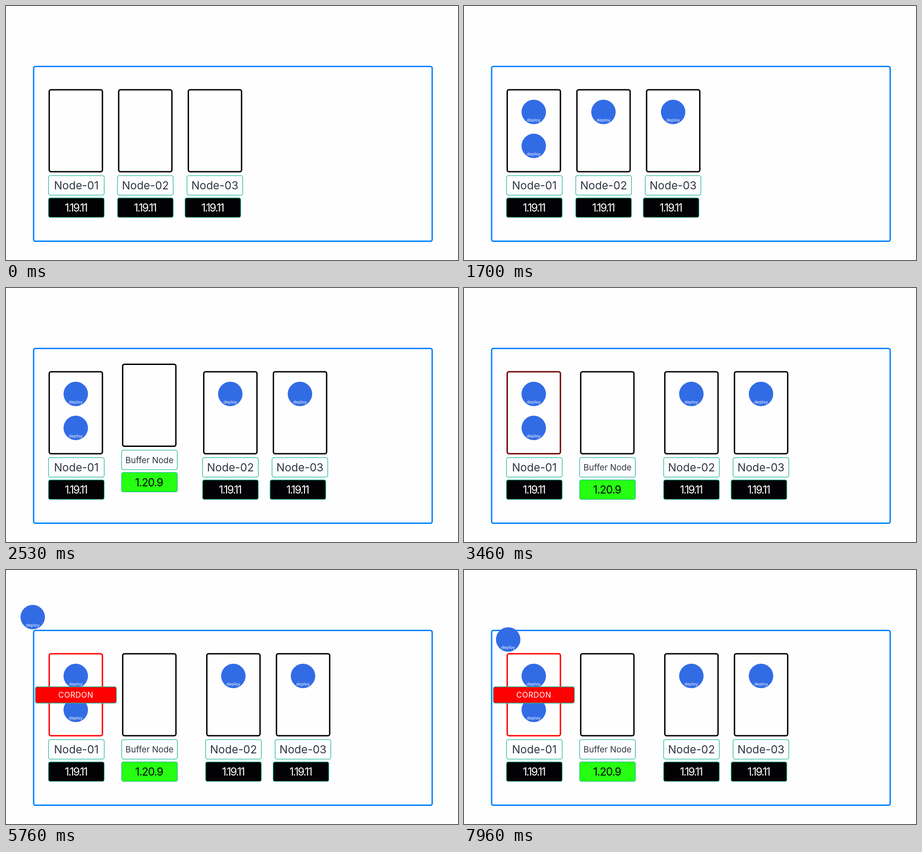
Write an HTML page that moves like this. It is 998 px wide and 561 px high and loops after 8 s.

```html
<!DOCTYPE html>
<html lang="en">
<head>
<meta charset="utf-8">
<title>Node upgrade</title>
<style>
html, body { margin: 0; width: 100%; height: 100%; overflow: hidden; background: #fefefe; }
svg { display: block; width: 100vw; height: 100vh; }
text { font-family: Inter, "Open Sans", sans-serif; text-anchor: middle; }
.tag { fill: none; stroke: #1fb598; stroke-width: 1.3; }
.box { fill: none; stroke: #000; stroke-width: 3; }
.name { fill: #2f3644; font-size: 24.4px; }
.small { font-size: 18.6px; }
.version { font-size: 24px; fill: #fff; letter-spacing: -2px; }
.new { fill: #000; letter-spacing: -1px; }
.deploy { fill: #fff; font: 9px "DejaVu Sans", sans-serif; }
</style>
</head>
<body>
<svg id="stage" viewBox="0 0 998 561"></svg>
<script>
const LOOP = 8000;
const stage = document.getElementById('stage');

function add(parent, tag, attrs, text) {
  const el = document.createElementNS('http://www.w3.org/2000/svg', tag);
  for (const key in attrs) el.setAttribute(key, attrs[key]);
  if (text) el.textContent = text;
  parent.appendChild(el);
  return el;
}

const rect = (parent, x, y, width, height, attrs) =>
  add(parent, 'rect', { x, y, width, height, rx: 4, ...attrs });

function icon(parent, x, y) {
  const g = add(parent, 'g', { transform: `translate(${x} ${y})` });
  add(g, 'circle', { r: 27, fill: '#326ce5' });
  add(g, 'text', { y: 20.5, class: 'deploy' }, 'deploy');
  return g;
}

function node(o) {
  const g = add(stage, 'g');
  const box = rect(g, o.box, 185, 117.5, 181, { class: 'box' });
  rect(g, o.label, 374.6, 123, 43, { class: 'tag' });
  add(g, 'text', { x: o.label + 61.5, y: 405, class: 'name', ...o.nameAttrs }, o.name);
  rect(g, o.tag, 423.9, 123, 43, { class: 'tag', style: 'fill:' + (o.fill || '#020204') });
  add(g, 'text', { x: o.tag + 60.5, y: 454, class: 'version ' + (o.fill ? 'new' : '') }, o.version || '1.19.11');
  const icons = add(g, 'g');
  (o.icons || []).forEach(y => icon(icons, o.box + 58.6, y));
  return { g, box, icons };
}

rect(stage, 61, 133.4, 880, 386.2, { fill: 'none', stroke: '#0080ff', 'stroke-width': 3 });
const first = node({ box: 95.4, label: 93.8, tag: 93.8, name: 'Node-01', icons: [234, 309] });
const second = node({ box: 248.8, label: 246.2, tag: 246.2, name: 'Node-02', icons: [234] });
const third = node({ box: 402.6, label: 399.6, tag: 395.2, name: 'Node-03', icons: [234] });
const spare = node({
  box: 257.7, label: 255.4, tag: 255.4, name: 'Buffer Node',
  nameAttrs: { class: 'name small', y: 403 }, version: '1.20.9', fill: '#26ff12'
});

const cordon = add(stage, 'g');
rect(cordon, -89.4, -18, 179, 36, { class: 'tag', style: 'fill:#f00' });
add(cordon, 'text', { y: 6, fill: '#fff', 'font-size': 17, 'letter-spacing': 0.5 }, 'CORDON');
const extra = icon(stage, 59, 104);

const part = (t, from, length) => Math.min(1, Math.max(0, (t - from) / length));

// cubic-bezier(.42, 0, .58, 1), solved by bisection
function ease(x) {
  if (x <= 0 || x >= 1) return x;
  let lo = 0, hi = 1, s = 0.5;
  for (let i = 0; i < 24; i++) {
    s = (lo + hi) / 2;
    const r = 1 - s;
    if (1.26 * s * r * r + 1.74 * s * s * r + s * s * s < x) lo = s; else hi = s;
  }
  return s * s * (3 - 2 * s);
}

function elastic(x) {
  if (x <= 0 || x >= 1) return x;
  return 1 - 2 ** (-10 * x) * Math.cos(x * 2 * Math.PI / 0.35);
}

const move = (el, x, y, scale = 1) =>
  el.setAttribute('transform', `translate(${x} ${y}) scale(${scale})`);
const show = (el, on) => el.setAttribute('visibility', on ? 'visible' : 'hidden');

function draw(t) {
  const fade = ease(part(t, 100, 1220));
  for (const n of [first, second, third]) n.icons.setAttribute('opacity', fade);

  const slide = ease(part(t, 1662, 1000));
  move(second.g, 194.6 * slide, 0);
  move(third.g, 194.6 * slide, 0);
  move(spare.g, -4 * (1 - slide), -474 * (1 - slide));
  show(spare.g, slide > 0);

  const red = Math.round(255 * ease(part(t, 2998, 1000)));
  first.box.style.stroke = `rgb(${red},0,0)`;

  const pop = part(t, 4796, 1000);
  show(cordon, pop > 0);
  move(cordon, 154.2, 276, elastic(pop));

  const travel = ease(part(t, 7262, 1300)) / ease(698 / 1300);
  show(extra, t >= 5760);
  move(extra, 59 + 38.5 * travel, 104 + 49.5 * travel);
}

let start;
function tick(now) {
  if (start === undefined) start = now;
  draw((now - start) % LOOP);
  requestAnimationFrame(tick);
}
draw(0);
requestAnimationFrame(tick);
</script>
</body>
</html>
```
